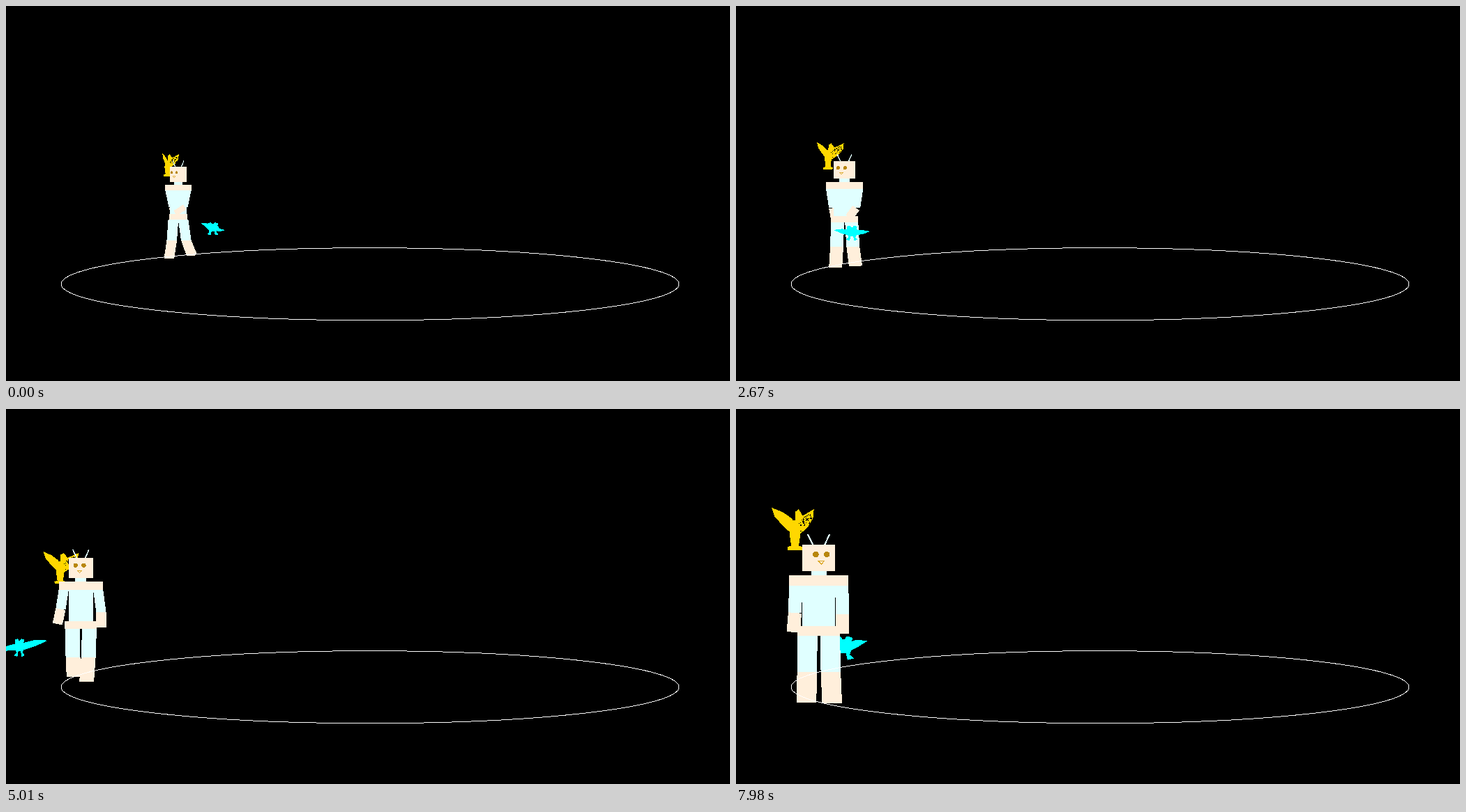
Write an HTML page that moves like this. It is 1038 px wide and 539 px high and loops after 8 s.

```html
<!DOCTYPE html>
<html lang="en">
<head>
<meta charset="utf-8">
<title>Walking robot with birds</title>
<style>
  html, body { margin: 0; width: 100%; height: 100%; overflow: hidden; background: #000; }
  svg { display: block; width: 1038px; height: 539px; }
</style>
</head>
<body>
<svg viewBox="0 0 1038 539" shape-rendering="crispEdges">
  <g id="scene"></g>
  <ellipse cx="522" cy="399.7" rx="443" ry="52.05" fill="none" stroke="#fff"/>
</svg>
<script>
const LOOP = 8;
const SKIN = '#ffefdb', SUIT = '#e0ffff', GOLD = '#ffd700', CYAN = '#00ffff', EYE = '#b8860b', BEAK = '#daa520';
const { sin, cos, abs, max, PI } = Math;
const scene = document.getElementById('scene');

// Cosine wave with a period and the time of its peak, in seconds
const wave = (t, period, peak) => cos((t - peak) / period * 2 * PI);

const poly = (fill, ...pts) =>
  `<polygon fill="${fill}" points="${pts.map(p => p.map(n => n.toFixed(2))).join(' ')}"/>`;
const box = (fill, x0, y0, x1, y1) => poly(fill, [x0, y0], [x1, y0], [x1, y1], [x0, y1]);
const line = (color, w, x0, y0, x1, y1) =>
  `<path stroke="${color}" stroke-width="${w}" d="M${x0} ${y0}L${x1} ${y1}"/>`;
const group = (x, y, sx, sy, content) =>
  `<g transform="translate(${x} ${y}) scale(${sx} ${sy})">${content}</g>`;
const mirror = half => [...half, ...half.map(([x, y]) => [-x, y]).reverse()];

let seed = 7;
const rnd = () => (seed = seed * 16807 % 2147483647) / 2147483647;
const specks = Array.from({ length: 40 }, () => {
  const u = rnd(), v = (rnd() - 0.5) * 0.4;
  return [0.2 + u * 0.65 + v * 0.5, -0.88 - u * 0.42 + v];
});

// Robot on its way round the ring: place, perspective and turn
function walk(t) {
  const k = 1 / (1 - 0.058 * t);
  const yaw = 0.16 * (t - 6.2);
  return {
    k, yaw,
    x: 522 - 310 * k * cos(0.16 * (t - 3)),
    top: 273 - 42 * k,
    tall: (20 + 112 * k) / 132,
    swing: wave(t, 10, 1)
  };
}

function limb(x0, y0, x1, y1, x2, y2, w, tilt) {
  const r = w / 2;
  return poly(SUIT, [x0 - r, y0], [x0 + r, y0], [x1 + r, y1], [x1 - r, y1])
    + poly(SKIN, [x1 - r, y1], [x1 + r, y1], [x2 + r, y2 - tilt], [x2 + r * 0.6, y2], [x2 - r, y2]);
}

function robot({ x, top, k, tall, yaw, swing }) {
  const c = cos(yaw), s = sin(yaw);
  const head = 11.2 * (c + 0.65 * abs(s)), wide = 21.4 * c + 8.3 * abs(s);
  const chin = 21.8, shoulder = 25.7, chest = 34, elbow = 58, hip = 67.7, crotch = 76, knee = 106, sole = 132;
  const fwd = max(swing, 0), back = max(-swing, 0);

  const leg = (side, stride, lift) => {
    const hx = side * wide * 0.38, dx = stride * swing * s;
    return limb(hx, crotch, hx + dx * 0.35, knee, hx + dx, sole - lift, head * 1.2, lift * 0.8 * (side > 0));
  };
  const arm = (side, inward, raise) => {
    const w = wide * 0.45, sx = side * (wide - w / 2);
    const ex = sx - side * (1 + 5 * swing), ey = elbow - raise;
    const upper = poly(SUIT, [sx - w / 2, chest], [sx + w / 2, chest], [ex + w / 2, ey], [ex - w / 2, ey]);
    return upper + line(SKIN, w, ex, ey, ex - side * inward, ey + 16 - 9 * fwd);
  };
  const antenna = side => line(SUIT, 1.2, side * head * 0.36, 0, side * head * 0.66, -8.5);
  const eye = side => `<circle fill="${EYE}" cx="${7 * s + side * wide * 0.185}" cy="8.2" r="${wide * 0.1}"/>`;
  const m = wide * 0.1;

  return group(x, top, k, tall,
    leg(-1, 9, 8 * back * back) + leg(1, -18, 6 * fwd * fwd)
    + arm(-1, 4 * swing, 4 * back)
    + box(SUIT, -head, chest, head, hip)
    + box(SKIN, -wide * 0.72, hip, wide * 0.72, crotch)
    + arm(1, 17 * fwd, 0)
    + box(SKIN, -wide, shoulder, wide, chest)
    + box(SUIT, -head * 0.46, chin, head * 0.46, shoulder)
    + antenna(-1) + antenna(1)
    + box(SKIN, -head, 0, head, chin)
    + eye(-1) + eye(1)
    + `<path fill="none" stroke="${BEAK}" stroke-width="0.7" d="M${7 * s - m} 13.6h${2 * m}l${-m} 2.8z"/>`);
}

// Bobs above the shoulder and turns with the robot
function goldBird(t, { x, top, k, tall, yaw }) {
  const c = cos(yaw), s = sin(yaw), size = 21;
  const y = top + 25.7 * tall - k * size * (0.48 + 0.7 * wave(t, 1.31, 0.3));
  const wing = (reach, pts) => pts.map(([a, b]) => [a * reach, b * size]);
  const left = [[-1, -1.56], [-.5, -1.38], [-.12, -1.15], [0, -.7], [-.15, -.6], [-.5, -.88], [-.86, -1.22]];
  const right = [[1, -1.5], [.95, -1.15], [.65, -.82], [.2, -.55], [0, -.7], [.03, -1.41], [.2, -1.5], [.4, -1.26]];
  const stem = mirror([[.16, -1.1], [.2, -.6], [.14, -.16], [.28, -.1], [.26, 0]]);
  const rightReach = 17.5 * c - 8 * s;
  return group(x + k * (5 * s - 20.5 * c), y, k, k,
    poly(GOLD, ...wing(18 * c + 3 * s, left))
    + poly(GOLD, ...wing(rightReach, right))
    + poly(GOLD, ...wing(size, stem))
    + wing(rightReach, specks).map(([a, b]) => box('#000', a, b, a + 0.8, b + 0.8)).join(''));
}

// Circles the robot while flapping
function cyanBird(t, { x, k }) {
  const turn = 0.7 * (t - 5.2), flap = wave(t, 3.9, 1.6);
  const dx = -3 - 60 * cos(turn);
  const dy = 43 - 9 * sin(turn) + 8.5 * wave(t, 4.4, 0);
  const span = 23.5 + 7.5 * flap, width = 7.5 - 2.2 * flap, tilt = 5 * wave(t, 12, 0);
  const wing = side => {
    const a = side * width * 0.4, tip = side * span, ty = -3 + side * tilt;
    return poly(CYAN, [a, -4.5], [tip * 0.55, ty * 0.8 - 2], [tip, ty], [tip * 0.6, ty * 0.6 + 2.5], [a, 3]);
  };
  const half = [[.1, -.75], [.3, -.98], [.8, -.85], [.7, -.45], [1, -.1], [.65, .25], [.55, .55], [.9, .85], [.35, .98], [.2, .4]];
  return group(x + k * dx, 273 + k * dy, k, k,
    wing(-1) + wing(1) + poly(CYAN, ...mirror(half).map(([a, b]) => [a * width, b * 9.4])));
}

function draw(t) {
  const pose = walk(t), bird = cyanBird(t, pose), behind = t > 5.2;
  scene.innerHTML = (behind ? bird : '') + goldBird(t, pose) + robot(pose) + (behind ? '' : bird);
}

const start = performance.now();
function tick() {
  draw((performance.now() - start) / 1000 % LOOP);
  requestAnimationFrame(tick);
}
tick();
</script>
</body>
</html>
```
